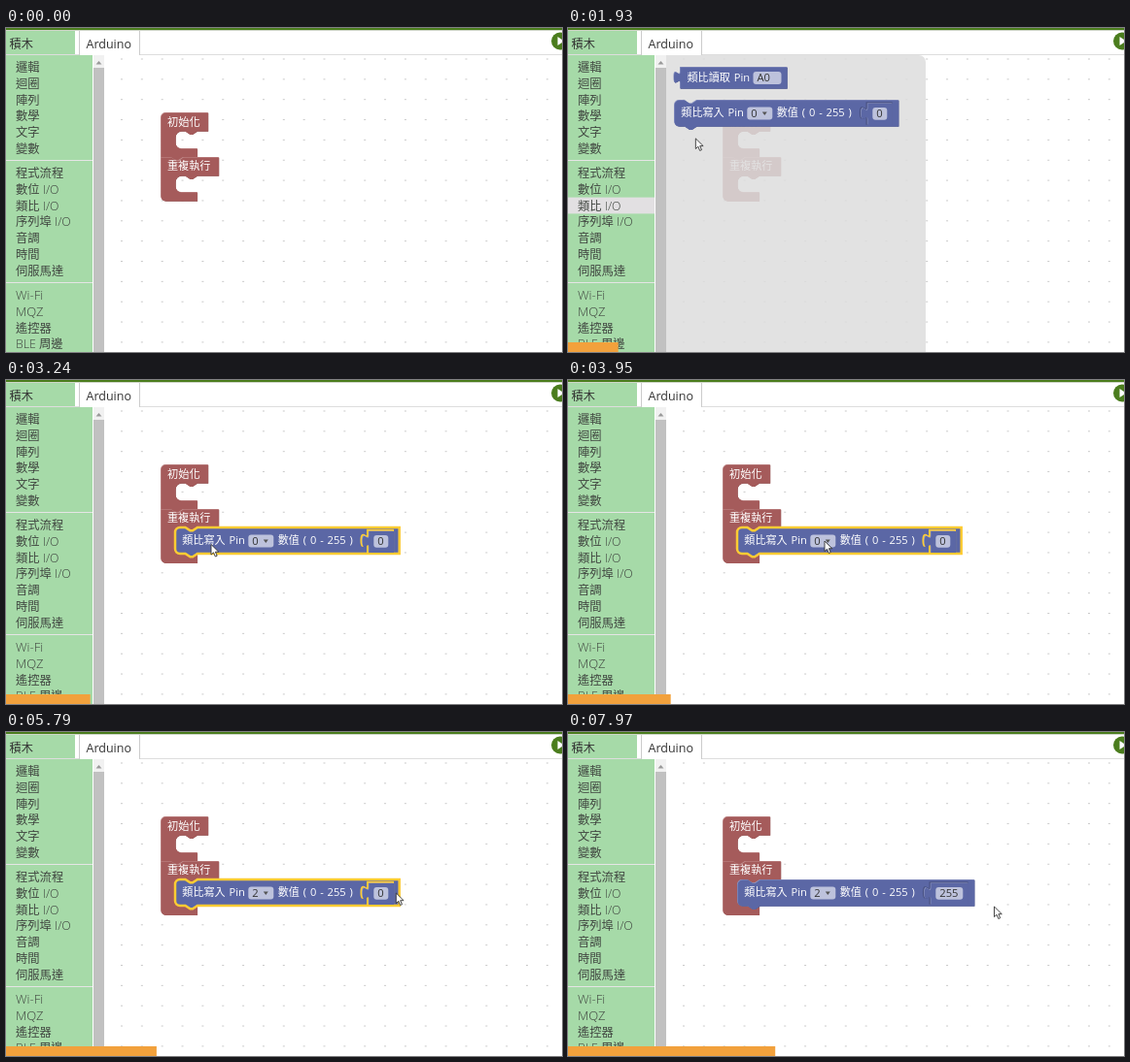
Recreate the animation shown at these times as an HTML page. Size 572 by 334 pixels, loop 8000 ms.

```html
<!DOCTYPE html>
<html lang="zh-Hant">
<head>
<meta charset="utf-8">
<title>Block editor</title>
<style>
  html, body { margin: 0; width: 100%; height: 100%; overflow: hidden; background: #fff; }
  svg { display: block; width: 100%; height: 100%; }
  text { font-family: "Open Sans", "Noto Sans CJK TC", "Noto Sans CJK", sans-serif; white-space: pre; }
  .list text { font-family: "Liberation Sans", sans-serif; }
</style>
</head>
<body>
<svg id="stage" viewBox="0 0 572 334" xmlns="http://www.w3.org/2000/svg">
  <g id="back"></g>
  <g id="live"></g>
</svg>
<script>
const LOOP = 8000;
const RED = { main: '#a55b5b', light: '#c39090', dark: '#844949' };
const BLUE = { main: '#5b67a5', light: '#8f98c4', dark: '#495284' };
const YELLOW = '#fc3';
const PILL = '#bdc2dc';

const rect = (x, y, w, h, fill, more = '') =>
  `<rect x="${x}" y="${y}" width="${w}" height="${h}" fill="${fill}" ${more}/>`;
const text = (x, y, s, size, fill, more = '') =>
  `<text x="${x}" y="${y}" font-size="${size}" fill="${fill}" ${more}>${s}</text>`;
const path = (d, fill, more = '') => `<path d="${d}" fill="${fill}" ${more}/>`;
const at = (x, y, s) => `<g transform="translate(${x} ${y})">${s}</g>`;

// Block outlines
const NOTCH = 'H10.5l5 3.3h2.5l5 -3.3';
const TAB = 'H23l-5 3.3h-2.5l-5 -3.3';

function cPath(w, inner, joined) {
  const top = joined ? 'M0 0' + NOTCH : 'M0 5a5 5 0 0 1 5 -5';
  const end = joined ? 'H5a5 5 0 0 1 -5 -5z' : TAB + 'H0z';
  return `${top}H${w}V19H37.4l-5 3.3h-2.5l-5 -3.3H21a6 6 0 0 0 -6 6v${inner - 12}` +
    `a6 6 0 0 0 6 6H37.4v9${end}`;
}
const stackPath = (w, h) =>
  `M0 5a5 5 0 0 1 5 -5${NOTCH}H${w}V${h}${TAB}H5a5 5 0 0 1 -5 -5z`;
const valuePath = w =>
  `M0 0H${w}V22H0V16.6c0 -8.3 -6.6 6.6 -6.6 -6.2s6.6 2.1 6.6 -6.2z`;

function shape(d, c, selected) {
  if (selected) return path(d, c.main, `stroke="${YELLOW}" stroke-width="2.5"`);
  return at(.7, .7, path(d, c.dark)) + path(d, c.light) + at(.6, .6, path(d, c.main));
}

const pill = (x, w, label, arrow) =>
  rect(x, 7.6, w, 12.8, PILL, 'rx="3"') +
  text(x + 4, 17.8, label, 11.2, '#333') +
  (arrow ? path(`M${x + 15.5} 12.4h5l-2.5 3.6z`, '#555') : '');

const label = (x, s) => text(x, 17.3, s, 11.1, '#fff', 'word-spacing="1"');

function writeBlock(x, y, o) {
  const grow = 6.5 * (o.value.length - 1);
  const socket = valuePath(25.5 + grow);
  let num = shape(socket, BLUE, o.editing);
  if (o.editing) {
    num += rect(5.5, 4.6, 15 + grow, 13, '#fff', 'rx="2"');
    if (o.picked) num += rect(9, 5.6, 7.5, 11, '#3297fd');
    num += text(9.5, 14.8, o.value, 11.2, o.picked ? '#fff' : '#333');
    if (o.caret) num += rect(16.6 + grow, 6, .8, 10, '#333');
  } else {
    num += at(0, -3, pill(5.5, 15 + grow, o.value));
  }
  const rim = o.selected
    ? path(socket, 'none', `stroke="${YELLOW}" stroke-width="2.5"`)
    : path(socket, 'none', `stroke="${BLUE.dark}" stroke-width="1.6"`);
  return at(x, y,
    shape(stackPath(230.7 + grow, 27), BLUE, o.selected) +
    label(7.3, '類比寫入 Pin') + pill(75.3, 26, o.pin, true) +
    label(105.7, '數值 ( 0 - 255 )') +
    at(198.3, 3, rim + (o.editing ? num : at(.5, .4, num))));
}

const readBlock = (x, y) => at(x, y,
  shape(valuePath(110), BLUE) + at(0, -2.5, label(7.5, '類比讀取 Pin') + pill(75.5, 29, 'A0')));

function redBlocks(inner) {
  return at(159, 87, shape(cPath(48.5, 18, false), RED)) +
    at(159, 133, shape(cPath(59.5, inner, true), RED)) +
    text(166, 100.5, '初始化', 11.3, '#fff') +
    text(166, 146.3, '重複執行', 11.1, '#fff');
}

// Toolbox
const GROUPS = [
  [40, ['邏輯', '迴圈', '陣列', '數學', '文字', '變數']],
  [149, ['程式流程', '數位 I/O', '類比 I/O', '序列埠 I/O', '音調', '時間', '伺服馬達']],
  [275, ['Wi-Fi', 'MQZ', '遙控器', 'BLE 周邊']]
];
const ROW = 16.8;

function toolbox(hover) {
  let s = rect(0, 28, 89, 306, '#a6daa8');
  if (hover >= 0) s += rect(0, 149 + ROW * hover - 8, 89, 16.8, '#e2e0e2');
  for (const y of [136, 262]) s += rect(0, y, 89, 1, '#e5e5e5');
  for (const [y, names] of GROUPS)
    names.forEach((n, i) => {
      const latin = /^[\w-]+$/.test(n);
      s += text(10, y + ROW * i + 4.9, n, latin ? 13 : 12.3, '#404640', 'font-weight="300"');
    });
  return s;
}

function background() {
  return `<defs><pattern id="dots" x="118" y="31.5" width="20.85" height="20.85" patternUnits="userSpaceOnUse">
    ${rect(0, 0, 2, 1, '#c9c9c9')}</pattern></defs>` +
    rect(0, 0, 572, 334, '#fff') + rect(101, 28, 471, 306, 'url(#dots)') +
    rect(0, 0, 572, 2, '#4b7d1e') + rect(0, 2, 572, 1, '#cfd6c8') +
    rect(0, 3, 71, 24.5, '#a6daa8') + rect(0, 27, 572, 1, '#ddd') +
    rect(75, 3, 63, 25, '#fff') + rect(75, 3, 1, 25, '#ccc') + rect(137, 3, 1, 25, '#ccc') +
    text(3.5, 20.5, '積木', 12.2, '#333', 'font-weight="300"') +
    text(82.5, 20.5, 'Arduino', 12.5, '#333') +
    `<circle cx="570" cy="13.5" r="9" fill="#4b7d1e"/>` + path('M567.5 9l7 4.5l-7 4.5z', '#fff') +
    rect(90, 28, 11, 306, '#f1f1f1') + rect(90, 41, 11, 293, '#c1c1c1') +
    path('M92.5 37.5h6l-3 -3.4z', '#999');
}

// Pin list
function pinList(y) {
  const rowY = n => 20.2 + 18.9 * (n - 3);
  const hot = Math.round((y - 20.2) / 18.9) + 3;
  let s = rect(229.5, -60, 103, 354.5, '#fff', 'stroke="#999"') +
    rect(230, rowY(hot) - 9.7, 102, 18.9, '#d6e9f8');
  for (let n = 2; n <= 17; n++) s += text(251, rowY(n) + 4.1, n, 10.8, '#333');
  return `<g class="list">${s}</g>`;
}

// Pointer: time, x, y
const TRACK = [
  [70, 398, 325], [780, 86, 200], [1060, 84, 197], [1290, 79.3, 175], [1500, 79.3, 175],
  [2150, 150, 92], [2380, 150, 92], [2480, 154.5, 97], [3020, 211, 169.5], [3520, 211, 169.5],
  [3930, 264, 166], [4150, 264, 166], [4580, 251.3, 18.5], [4780, 251.3, 18.5],
  [5020, 255, 4], [5230, 255, 4], [5740, 401.3, 166], [5950, 401.3, 166],
  [6070, 388, 166], [6280, 388, 166], [6720, 438.5, 180]
];
const CLICKS = [[1290, 1480], [2330, 3050], [4000, 4130], [5130, 5260], [6080, 6200], [7760, 7900]];
const within = (t, a, b) => t >= a && t < b;

function pointer(t) {
  const i = TRACK.findIndex(k => k[0] > t);
  if (i < 0) return TRACK[TRACK.length - 1].slice(1);
  const a = TRACK[Math.max(0, i - 1)], b = TRACK[i];
  const u = Math.max(0, (t - a[0]) / (b[0] - a[0]));
  const e = u * u * (3 - 2 * u);
  return [a[1] + (b[1] - a[1]) * e, a[2] + (b[2] - a[2]) * e];
}

function cursor(t, x, y) {
  if (t < 70) return '';
  const halo = CLICKS.some(([a, b]) => within(t, a, b))
    ? '<circle r="9.5" fill="#dfe800" opacity=".62"/>' : '';
  const hand = path('M-4 1q-1 -3 1 -3.4q.6 -2 2.4 -1q1.6 -1.4 2.6 .2q2 -.6 2.2 1.4' +
    'q1.6 0 1.4 2.4q0 3 -1.8 4.8v2.2h-5.4v-2q-2 -2 -2.4 -4.6z', '#f6ee9a',
    'stroke="#6b6524" stroke-width=".7"');
  const arrow = path('M0 0v10.6l2.5 -2.3l1.8 4.2l1.9 -.8l-1.8 -4h3.4z', '#fff',
    'stroke="#333" stroke-width=".9"');
  return at(x, y, halo + (within(t, 2330, 3050) ? hand : arrow));
}

function scene(t) {
  const [x, y] = pointer(t);
  const flyout = within(t, 1490, 2400);
  const dropped = t >= 3050;
  const dragging = within(t, 2400, 3050);

  let hover = -1;
  if (flyout) hover = 2;
  else if (t > 70 && t < 1490 && x < 89) hover = Math.round((y - 149) / ROW);

  const typed = t < 7000 ? '0' : '255'.slice(0, 1 + Math.floor((t - 7000) / 160));
  const state = {
    pin: t < 5230 ? '0' : '2',
    value: typed,
    selected: t >= 2400 && t < 6120,
    editing: within(t, 6120, 7780),
    picked: t < 7000,
    caret: t >= 7000 && t % 1000 < 500
  };

  let s = toolbox(hover) + redBlocks(dropped ? 27.3 : 17);
  if (flyout)
    s += path('M101 28H361a7 7 0 0 1 7 7V334H101z', '#ddd', 'opacity=".85"') +
      readBlock(115, 40) + writeBlock(109, 74, state);
  if (dragging) s += writeBlock(x - 41, y - 17.5, state);
  if (dropped) s += writeBlock(174, 152, state);
  if (within(t, 4110, 5230)) s += pinList(y);
  return s + rect(0, 324, t * .02675, 10, '#f2a13c') + cursor(t, x, y);
}

document.getElementById('back').innerHTML = background();
const live = document.getElementById('live');
const start = performance.now();

function tick() {
  live.innerHTML = scene((performance.now() - start) % LOOP);
  requestAnimationFrame(tick);
}
tick();
</script>
</body>
</html>
```
